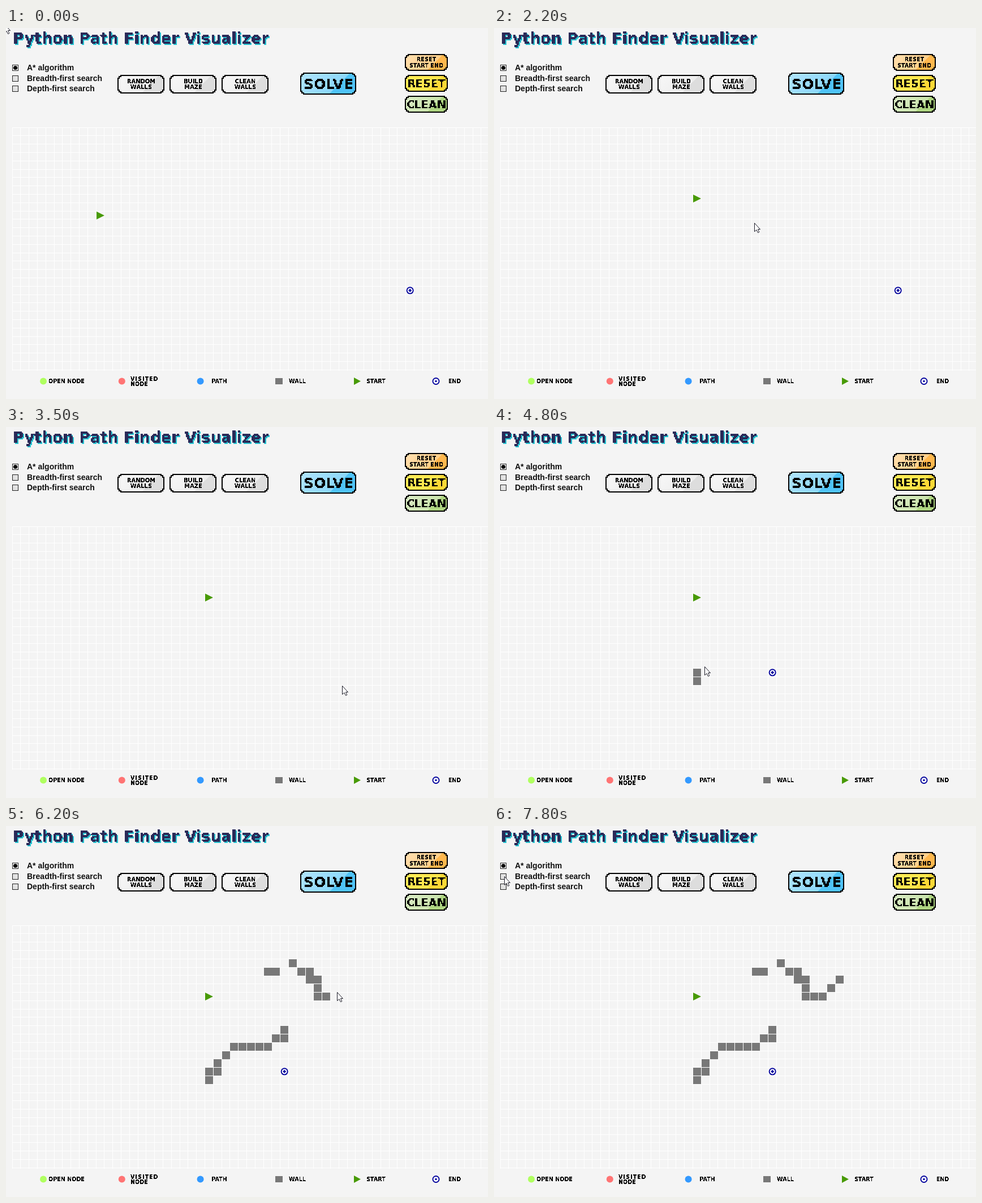
Write an HTML page with a canvas that moves like this. It is 852 by 657 pixels and loops after 8 s.

```html
<!DOCTYPE html>
<html lang="en">
<head>
<meta charset="utf-8">
<title>Python Path Finder Visualizer</title>
<style>
html, body { margin: 0; width: 100%; height: 100%; overflow: hidden; background: #f4f4f4; }
canvas { display: block; }
</style>
</head>
<body>
<canvas id="stage" width="852" height="657"></canvas>
<script>
const W = 852, H = 657, LOOP = 8000, STEP = 100, PITCH = 14.8;
const WALL = '#787878', GREEN = '#489a06', NAVY = '#00009c';
const stage = document.getElementById('stage').getContext('2d');

const colX = c => Math.round(11.6 + c * PITCH);
const rowY = r => Math.round(176.5 + r * PITCH);

function layer(w, h) {
  const canvas = document.createElement('canvas');
  canvas.width = w;
  canvas.height = h;
  return canvas.getContext('2d', { willReadFrequently: true });
}

function polygon(g, points, fill, stroke) {
  g.beginPath();
  points.forEach(([x, y]) => g.lineTo(x, y));
  g.closePath();
  g.fillStyle = fill;
  g.fill();
  if (stroke) {
    g.strokeStyle = stroke;
    g.lineWidth = 1;
    g.stroke();
  }
}

function disc(g, x, y, r, fill) {
  g.beginPath();
  g.arc(x, y, r, 0, 7);
  g.fillStyle = fill;
  g.fill();
}

function ring(g, x, y) {
  disc(g, x, y, 6.5, NAVY);
  disc(g, x, y, 4.6, '#fff');
}

function triangle(g, x, y, w, h) {
  polygon(g, [[x, y], [x + w, y + h / 2], [x, y + h]], GREEN);
}

// Hard-edged text built from square dots, centred on x unless align is 'left'.
function dotText(g, text, x, y, size, { color = '#000', dot = 1, gap = 0, align = 'center' } = {}) {
  const width = 500 / dot, height = 60 / dot, anchor = align === 'left' ? 0 : width / 2;
  const t = layer(width, height);
  t.font = `bold ${size / dot}px "DejaVu Sans", sans-serif`;
  t.letterSpacing = gap / dot + 'px';
  t.textAlign = align;
  t.fillStyle = color;
  t.fillText(text, anchor, 40 / dot);
  const image = t.getImageData(0, 0, width, height);
  for (let i = 3; i < image.data.length; i += 4) image.data[i] = image.data[i] > 120 ? 255 : 0;
  t.putImageData(image, 0, 0);
  g.imageSmoothingEnabled = false;
  g.drawImage(t.canvas, Math.round(x - anchor * dot), Math.round(y) - 40, 500, 60);
}

function steppedBox(g, x, y, w, h, fill) {
  g.fillStyle = fill;
  for (const [dx, dy] of [[5, 0], [2, 2], [0, 5]]) g.fillRect(x + dx, y + dy, w - 2 * dx, h - 2 * dy);
}

function button(g, x, y, w, h, light, dark, size, ...lines) {
  const run = (w + h) / 2;
  const shade = g.createLinearGradient(x, y, x + run, y + run);
  shade.addColorStop(0, light);
  shade.addColorStop(0.64, `color-mix(in srgb, ${light} 60%, ${dark})`);
  shade.addColorStop(0.65, dark);
  steppedBox(g, x, y, w, h, '#000');
  steppedBox(g, x + 2, y + 2, w - 4, h - 4, shade);
  lines.forEach((line, i) => {
    const middle = y + h / 2 + (i - (lines.length - 1) / 2) * (size + 0.5);
    dotText(g, line, x + w / 2, middle + size * 0.365, size, { dot: size > 15 ? 2 : 1 });
  });
}

function drawTitle(g) {
  for (const [x, y, color] of [[14, 30, '#27c4d2'], [12, 28, '#2a2a58']]) {
    dotText(g, 'Python Path Finder Visualizer', x, y, 27, { color, dot: 2, align: 'left' });
  }
}

function drawOptions(g) {
  g.font = 'bold 14px "Liberation Sans", Arial, sans-serif';
  ['A* algorithm', 'Breadth-first search', 'Depth-first search'].forEach((name, i) => {
    const y = Math.round(65 + i * 18.6);
    g.fillStyle = i ? '#e2e2e2' : '#fff';
    g.strokeStyle = '#222';
    g.lineWidth = 1;
    g.fillRect(11, y, 11, 11);
    g.strokeRect(11.5, y + 0.5, 10, 10);
    if (!i) disc(g, 16.5, y + 5.5, 3.6, '#000');
    g.fillStyle = '#111';
    g.fillText(name, 37, y + 10);
  });
}

function drawButtons(g) {
  ['RANDOM WALLS', 'BUILD MAZE', 'CLEAN WALLS'].forEach((name, i) => {
    button(g, 197 + Math.floor(i * 92.4), 83, 83, 33, '#f8f8f8', '#dddddd', 10, ...name.split(' '));
  });
  button(g, 520, 79, 99, 39, '#b3e5fc', '#4fc3f7', 25, 'SOLVE');
  button(g, 705, 46, 76, 30, '#ffe0b2', '#ffb74d', 9.7, 'RESET', 'START END');
  button(g, 705, 83, 76, 30, '#ffee58', '#fdd835', 19, 'RESET');
  button(g, 705, 120, 76, 30, '#dcedc8', '#aed581', 19, 'CLEAN');
}

function drawGrid(g) {
  g.fillStyle = '#fff';
  for (let c = 0; c < 57; c++) g.fillRect(colX(c) - 1, 176, 1, 431);
  for (let r = 0; r < 30; r++) g.fillRect(11, rowY(r) - 1, W - 11, 1);
}

function drawLegend(g) {
  const y = 625.5, iconX = i => 66 + i * 138.8;
  ['#b0ff60', '#ff7474', '#3399ff'].forEach((color, i) => disc(g, iconX(i), y, 6, color));
  g.fillStyle = WALL;
  g.fillRect(476, 620, 13, 11);
  triangle(g, 615, 619, 12, 13);
  ring(g, 760, y);
  disc(g, 760, y, 1.7, NAVY);
  ['OPEN NODE', 'VISITED/NODE', 'PATH', 'WALL', 'START', 'END'].forEach((name, i) => {
    const x = iconX(i) + (i < 2 ? 41 : 33), lines = name.split('/');
    if (lines.length === 1) return dotText(g, name, x, 629, 9.6);
    lines.forEach((line, n) => {
      dotText(g, line, x - 26, 625 + n * 9, 9.6, { gap: 1 - n, align: 'left' });
    });
  });
}

// The pointer's journey: glides between places, and strokes that leave walls behind.
const legs = [], walls = [];
let last = [37, 170];

const mix = (a, b, k) => a.map((v, i) => v + (b[i] - v) * k);

function glide(start, end, x, y, power = 1) {
  const from = last, to = [x, y];
  legs.push({ start, at: t => mix(from, to, 1 - (1 - Math.min(1, (t - start) / (end - start))) ** power) });
  last = to;
}

// Walks cell by cell through the corners; the pointer runs a little ahead of the walls.
function stroke(start, end, ...corners) {
  const cells = [corners[0]];
  for (const [c, r] of corners.slice(1)) {
    let [x, y] = cells.at(-1);
    while (x !== c || y !== r) cells.push([x += Math.sign(c - x), y += Math.sign(r - y)]);
  }
  const end0 = cells.length - 1, pace = (end - start) / end0;
  cells.forEach(([c, r], i) => walls.push({ time: start + i * pace, c, r }));
  const at = t => {
    const place = Math.min(end0, (t - start) / pace + 0.7), i = Math.floor(place);
    const [c, r] = mix(cells[i], cells[Math.min(end0, i + 1)], place - i);
    return [colX(c) + 5, rowY(r) + 5];
  };
  legs.push({ start, at });
  last = at(end);
}

glide(500, 1300, 166, 333, 3);
glide(1400, 1700, 360, 297);
glide(2100, 2700, 717, 467, 1.8);
glide(2800, 3000, 713, 466);
glide(3200, 3500, 594, 458);
glide(3500, 3700, 496, 435);
glide(4200, 4600, 359, 449);
stroke(4700, 5330, [23, 18], [23, 17], [24, 17], [24, 16], [26, 14], [30, 14], [31, 13], [32, 13], [32, 12]);
glide(5400, 5600, 460, 255);
stroke(5720, 5800, [30, 5], [31, 5]);
stroke(5870, 6300, [33, 4], [34, 5], [35, 5], [35, 6], [36, 6], [36, 8], [38, 8], [40, 6]);
glide(6400, 7000, 99, 106, 1.5);
glide(7100, 7800, 18, 89, 1.5);

function drawPointer(g, t) {
  if (t >= STEP && t < legs[0].start) return;
  const [x, y] = t < STEP ? [-3, -7] : legs.findLast(leg => leg.start <= t).at(t).map(Math.round);
  const arrow = [[0, 0], [0, 15], [3.5, 12], [6, 17], [8.3, 16], [6, 11], [10, 11]];
  polygon(g, arrow.map(([dx, dy]) => [x + dx + 0.5, y + dy + 0.5]), '#fff', '#1c1c28');
}

function drawStart(g, c, r) {
  triangle(g, colX(c), rowY(r), 14, 14);
}

function drawEnd(g, c, r) {
  const x = colX(c) + 7.2, y = rowY(r) + 6.8;
  ring(g, x, y);
  polygon(g, [[x - 3, y], [x, y - 3], [x + 3, y], [x, y + 3]], NAVY);
}

const back = layer(W, H);
back.fillStyle = '#f4f4f4';
back.fillRect(0, 0, W, H);
[drawTitle, drawOptions, drawButtons, drawGrid, drawLegend].forEach(draw => draw(back));

function frame(now) {
  const t = Math.floor((now % LOOP) / STEP) * STEP;
  stage.drawImage(back.canvas, 0, 0);
  stage.fillStyle = WALL;
  for (const { time, c, r } of walls) {
    if (t >= time) stage.fillRect(colX(c), rowY(r), 14, 14);
  }
  if (t < 1300) drawStart(stage, 10, 10);
  else if (t >= 2000) drawStart(stage, 23, 8);
  if (t < 2700) drawEnd(stage, 47, 19);
  else if (t >= 4000) drawEnd(stage, 32, 17);
  drawPointer(stage, t);
}

const begin = performance.now();
(function tick() {
  frame(performance.now() - begin);
  requestAnimationFrame(tick);
})();
</script>
</body>
</html>
```
